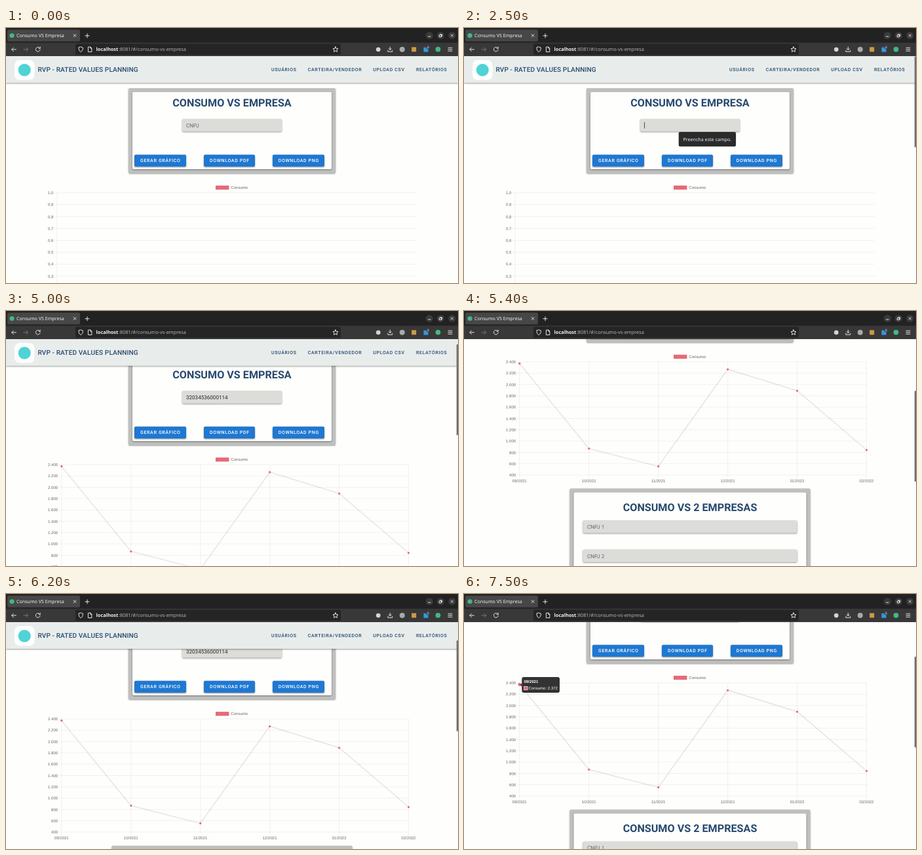
Write an HTML page that moves like this. It is 690 px wide and 390 px high and loops after 8 s.

```html
<!DOCTYPE html>
<html lang="pt-BR">
<head>
<meta charset="utf-8">
<title>Consumo VS Empresa</title>
<style>
@property --s { syntax: "<number>"; inherits: true; initial-value: 0; }
html, body { margin: 0; width: 100%; height: 100%; overflow: hidden; background: #fefefd; }
svg { display: block; width: 690px; height: 390px; animation: scroll 8s infinite linear; }
text { text-rendering: geometricPrecision; white-space: pre; }
.ui { font-family: "Noto Sans", "Open Sans", sans-serif; fill: #f2f2f2; }
.rb { font-family: Roboto, sans-serif; }
.h1 { font-weight: 700; font-size: 16.16px; fill: #27496d; text-anchor: middle; }
.btn { font-weight: 500; font-size: 7.07px; letter-spacing: .63px; }
.navy { fill: #27496d; }
.in { font-size: 8.08px; fill: #666; }
.ch { font-family: "Liberation Sans", Arial, sans-serif; font-size: 6.06px; fill: #666; }
.end { text-anchor: end; }
.mid { text-anchor: middle; }
.sh { filter: drop-shadow(0 1px .8px rgba(0,0,0,.4)); }
.ic { fill: none; stroke: #e4e4e4; stroke-width: 1; stroke-linecap: round; stroke-linejoin: round; }
.grid { stroke: #000; stroke-opacity: .1; stroke-width: .6; fill: none; }

#page { transform: translateY(calc(var(--s) * -1px)); }
#thumb { transform: translateY(calc(var(--s) * .45px)); }
#bar { animation: bar 8s infinite linear; }
#nav { animation: nav 8s infinite cubic-bezier(.4,0,.2,1); }
#label { animation: label 8s infinite step-end; }
#caret { animation: caret 8s infinite step-end; }
#value { animation: value 8s infinite step-end; }
#hint { animation: hint 8s infinite step-end; }
#hover { animation: hover 8s infinite linear; }
#ripple { transform-origin: 235px 203px; animation: ripple 8s infinite linear; }
#empty { animation: empty 8s infinite step-end; }
#full { animation: full 8s infinite step-end; }
#line { transform-origin: 0 425px; vector-effect: non-scaling-stroke; animation: grow 8s infinite linear; }
.dot { fill: #e0637a; animation: rise 8s infinite linear; }
.dot.first { animation: rise 8s infinite linear, swell 8s infinite linear; }
#tip { animation: tip 8s infinite linear; }

@keyframes scroll {
  0%, 60.6% { --s: 0; animation-timing-function: ease-in; }
  62.5% { --s: 16.5; }
  67.5% { --s: 174; animation-timing-function: ease-out; }
  70.6%, 72% { --s: 200; animation-timing-function: ease-in-out; }
  77.5% { --s: 61; animation-timing-function: ease-out; }
  78.1%, 79% { --s: 58; animation-timing-function: ease-in-out; }
  82.5%, 100% { --s: 116; }
}
@keyframes nav {
  0%, 64.4% { transform: none; }
  66.9%, 72.6% { transform: translateY(-47px); }
  75.1%, 79.4% { transform: none; }
  81.9%, 100% { transform: translateY(-47px); }
}
@keyframes bar { 0%, 9.9% { opacity: 0; } 11.2%, 100% { opacity: 1; } }
@keyframes label { 0% { opacity: 1; } 23.75%, 100% { opacity: 0; } }
@keyframes caret { 0% { opacity: 0; } 23.75% { opacity: 1; } 38.75%, 100% { opacity: 0; } }
@keyframes value { 0% { opacity: 0; } 38.75%, 100% { opacity: 1; } }
@keyframes hint { 0% { opacity: 0; } 31.25% { opacity: 1; } 33.75%, 100% { opacity: 0; } }
@keyframes hover { 0%, 41% { opacity: 0; } 43.75%, 58% { opacity: .1; } 61%, 100% { opacity: 0; } }
@keyframes ripple {
  0%, 49% { transform: scale(.1); opacity: 0; }
  50% { transform: scale(.45); opacity: .14; }
  53% { transform: scale(1); opacity: .14; }
  56%, 100% { transform: scale(1); opacity: 0; }
}
@keyframes empty { 0% { opacity: 1; } 51.25%, 100% { opacity: 0; } }
@keyframes full { 0% { opacity: 0; } 51.25%, 100% { opacity: 1; } }
@keyframes grow {
  0%, 51.25% { transform: scaleY(.001); animation-timing-function: cubic-bezier(.25,1,.5,1); }
  63.75%, 100% { transform: scaleY(1); }
}
@keyframes rise {
  0%, 51.25% { transform: translateY(var(--d)); animation-timing-function: cubic-bezier(.25,1,.5,1); }
  63.75%, 100% { transform: translateY(0); }
}
@keyframes swell { 0%, 91% { r: 1.6px; } 93%, 100% { r: 2.3px; } }
@keyframes tip { 0%, 91% { opacity: 0; } 93.5%, 100% { opacity: 1; } }
</style>
</head>
<body>
<svg viewBox="0 0 690 390" xmlns="http://www.w3.org/2000/svg">
  <defs>
    <clipPath id="btnClip"><rect x="196" y="193.7" width="79" height="18.3" rx="2"/></clipPath>
  </defs>
  <rect width="690" height="390" fill="#fefefd"/>

  <g id="page">
    <g id="cards"></g>
    <rect id="hover" x="196" y="193.7" width="79" height="18.3" rx="2" fill="#fff"/>
    <g clip-path="url(#btnClip)"><circle id="ripple" cx="235" cy="203" r="45" fill="#fff"/></g>
    <g id="btnText" class="rb btn mid" fill="#fff"></g>
    <text id="label" class="rb in" x="275" y="151.7">CNPJ</text>
    <rect id="caret" x="275" y="144" width=".8" height="9.6" fill="#222"/>
    <text id="value" class="rb in" x="275" y="151.7" style="fill:#262626">32034536000114</text>
    <rect x="320" y="241" width="20.4" height="6.2" fill="#e66a78"/>
    <text class="ch" x="343.3" y="246.1">Consumo</text>
    <g id="empty"></g>
    <g id="full"></g>
    <g id="tip">
      <path d="M85.8 255l2.5-2.6v5.2z" fill="#000" fill-opacity=".8"/>
      <rect x="88.3" y="243" width="57.7" height="24" rx="3" fill="#000" fill-opacity=".8"/>
      <text class="ch" x="91.4" y="251.6" style="fill:#fff;font-weight:700">09/2021</text>
      <rect x="91.7" y="257.4" width="5.4" height="5.4" fill="#e66a78" stroke="#fff" stroke-width=".6"/>
      <text class="ch" x="98.6" y="262.1" style="fill:#fff">Consumo: 2.372</text>
    </g>
  </g>

  <g id="hint">
    <rect x="327.7" y="159" width="87.4" height="22.3" rx="2.2" fill="#2b2b2b"/>
    <text class="ui" x="334.4" y="172.7" font-size="7.13">Preencha este campo.</text>
  </g>

  <g id="nav">
    <rect x="0" y="42" width="690" height="41.8" fill="#e8edec" style="filter:drop-shadow(0 1px 1px rgba(0,0,0,.4))"/>
    <rect x="13" y="49" width="30.5" height="30.5" rx="8" fill="#fdfefe"/>
    <circle cx="28.2" cy="64.3" r="9.5" fill="#4fd3d6"/>
    <text class="rb navy" x="48.4" y="67.1" font-size="10.1" font-weight="500" letter-spacing=".126">RVP - RATED VALUES PLANNING</text>
    <g class="rb btn navy">
      <text x="404.9" y="66.1">USUÁRIOS</text>
      <text x="460.8" y="66.1">CARTEIRA/VENDEDOR</text>
      <text x="560.3" y="66.1">UPLOAD CSV</text>
      <text x="626" y="66.1">RELATÓRIOS</text>
    </g>
  </g>

  <g id="bar"><rect id="thumb" x="687.8" y="43.5" width="2.2" height="139" rx="1" fill="#6f6f6f"/></g>

  <g id="browser">
    <rect width="690" height="23" fill="#222"/>
    <rect y="22.5" width="690" height="20.5" fill="#383838"/>
    <rect x="2" y="2.5" width="111" height="18" rx="2" fill="#474747"/>
    <circle cx="9" cy="11.5" r="3.6" fill="#42b883"/>
    <text class="ui" x="16" y="14.1" font-size="7.1">Consumo VS Empresa</text>
    <path class="ic" stroke-width=".8" d="M103.2 9.7l3.6 3.6m0-3.6l-3.6 3.6M121 11.8h6m-3-3v6"/>
    <g fill="#3a3a3a"><circle cx="646.3" cy="11.5" r="5.6"/><circle cx="663.4" cy="11.5" r="5.6"/><circle cx="680.8" cy="11.5" r="5.6"/></g>
    <path class="ic" stroke-width=".8" d="M644.5 13h3.6M661.7 10.8h2.8v2.8h-2.8zM662.8 9.7h2.8v2.8M679.2 9.9l3.2 3.2m0-3.2l-3.2 3.2"/>

    <path class="ic" d="M15.4 32.8H8.8m2.7-2.8l-2.8 2.8 2.8 2.8"/>
    <path class="ic" style="stroke:#777" d="M27 32.8h6.6m-2.7-2.8l2.8 2.8-2.8 2.8"/>
    <path class="ic" d="M51.7 30.8a3.4 3.4 0 1 0 .5 2.4M52.2 29v2.2H50"/>
    <rect x="106" y="24.3" width="405" height="16.7" rx="2" fill="#252525"/>
    <path class="ic" stroke-width=".8" d="M114.2 28.9l3.2 1.1c0 3.4-.9 5.3-3.2 6.6-2.3-1.3-3.2-3.2-3.2-6.6z"/>
    <path class="ic" stroke-width=".8" d="M125.8 29h3l2 2v5.5h-5zM128.8 29v2h2"/>
    <g class="ui" font-size="7.4">
      <text x="137.6" y="35.4" font-weight="600">localhost</text>
      <text x="171.8" y="35.4" font-size="7.35" style="fill:#b4b4b4">:8081/#/consumo-vs-empresa</text>
    </g>
    <path class="ic" stroke-width=".8" d="M503 28.7l1.2 2.6 2.8.3-2.1 1.9.6 2.8-2.5-1.4-2.5 1.4.6-2.8-2.1-1.9 2.8-.3z"/>
    <circle cx="568.3" cy="32.8" r="3.4" fill="#d4d4d4"/>
    <path class="ic" d="M586.3 29v4.4m-2-1.9l2 2 2-2M582.9 34.2v2h6.8v-2"/>
    <circle cx="604.8" cy="32.8" r="4" fill="#a9a9a9"/>
    <rect x="619.2" y="29.3" width="7" height="7" fill="#cf9a45"/>
    <rect x="637.5" y="29.6" width="7" height="7" fill="#2f9be0"/>
    <rect x="641.6" y="26.2" width="5.6" height="5.6" rx="1" fill="#3c3a52"/>
    <text class="ui mid" x="644.4" y="30.7" font-size="4.8">6</text>
    <circle cx="659.5" cy="32.6" r="3.9" fill="#42b883"/>
    <path class="ic" d="M675 30.2h6M675 32.7h6M675 35.2h6"/>
  </g>
</svg>
<script>
const $ = id => document.getElementById(id);
const rect = (x, y, w, h, fill, extra = '') =>
  `<rect x="${x}" y="${y}" width="${w}" height="${h}" rx="2" fill="${fill}" ${extra}/>`;
const text = (x, y, cls, s) => `<text x="${x}" y="${y}" class="${cls}">${s}</text>`;
const SH = 'class="sh"';

const panel = (x, y, w, h) =>
  rect(x, y, w, h, '#bfbfbd', SH) + rect(x + 6, y + 6, w - 12, h - 12, '#fefefd', SH);
const field = (x, y, w) => rect(x, y, w, 19.3, '#dcdcd9', SH);

const buttons = [[196, 79, 'GERAR GRÁFICO'], [302, 78, 'DOWNLOAD PDF'], [407, 79, 'DOWNLOAD PNG']];

$('cards').innerHTML =
  panel(187, 92, 316, 130) + text(345, 120.2, 'rb h1', 'CONSUMO VS EMPRESA') + field(269, 139, 152) +
  buttons.map(([x, w]) => rect(x, 193.7, w, 18.3, '#1f78d1', SH)).join('') +
  panel(161.5, 445.8, 367, 260) + text(345, 480, 'rb h1', 'CONSUMO VS 2 EMPRESAS') +
  [494.5, 539].map((y, i) => field(181.5, y, 327) + text(188, y + 12.8, 'rb in', 'CNPJ ' + (i + 1))).join('');
$('btnText').innerHTML = buttons.map(([x, w, s]) => text(x + w / 2 + .3, 205.2, '', s)).join('');

// Chart without data: 1,0 down to 0,0
let rows = '<path class="grid" d="M78 252V434"/>';
for (let i = 0; i <= 10; i++) {
  const y = 252 + i * 18.2;
  rows += `<path class="grid" d="M74 ${y}H627"/>` +
    text(72.4, y + 2.1, 'ch end', (1 - i / 10).toFixed(1).replace('.', ','));
}
$('empty').innerHTML = rows;

// Chart with data
const months = ['09/2021', '10/2021', '11/2021', '12/2021', '01/2022', '02/2022'];
const values = [2372, 868, 554, 2270, 1891, 842];
const px = i => 84.8 + i * 105.95;
const py = v => 252 + (2400 - v) * .0865;
let plot = '';
for (let v = 2400; v >= 400; v -= 200) {
  const s = v < 1000 ? v : (v / 1000).toFixed(3);
  plot += `<path class="grid" d="M81 ${py(v)}H614.5"/>` + text(79.2, py(v) + 2.1, 'ch end', s);
}
months.forEach((m, i) => {
  plot += `<path class="grid" d="M${px(i)} 252V429"/>` + text(px(i), 436.2, 'ch mid', m);
});
const path = values.map((v, i) => `${px(i)} ${py(v)}`).join('L');
plot += `<path id="line" d="M${path}" fill="none" stroke="#000" stroke-opacity=".1" stroke-width="1.5"/>`;
values.forEach((v, i) => {
  plot += `<circle class="dot${i ? '' : ' first'}" cx="${px(i)}" cy="${py(v)}" r="1.6" style="--d:${425 - py(v)}px"/>`;
});
$('full').innerHTML = plot;
</script>
</body>
</html>
```
